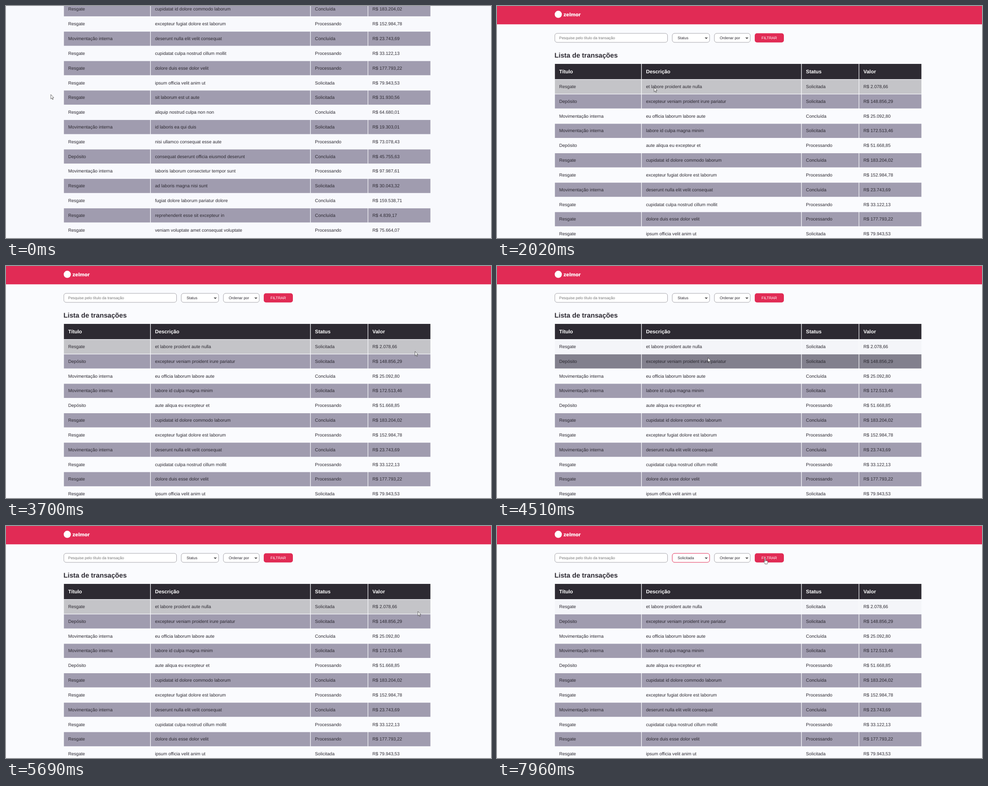
An HTML page with a canvas for the animation above (7.99 s loop, 1082 px wide and 517 px high).

```html
<!DOCTYPE html>
<html lang="pt-BR">
<head>
<meta charset="utf-8">
<title>Lista de transações</title>
<style>
html, body { margin: 0; width: 100%; height: 100%; overflow: hidden; background: #fafbfe; }
canvas { display: block; }
</style>
</head>
<body>
<canvas id="stage" width="1082" height="517"></canvas>
<script>
const ctx = document.getElementById('stage').getContext('2d');
ctx.textRendering = 'geometricPrecision';

const W = 1082, H = 517, LOOP = 7990;
const PAGE = '#fafbfe', INK = '#2d2a32', PINK = '#e12b55', STRIPE = '#a09caf';
const SANS = '"Liberation Sans", Arial, sans-serif';
const ZOOM = 0.631;
const SMALL = 13.333 * ZOOM, BODY = 16 * ZOOM, LARGE = 18 * ZOOM, TITLE = 24 * ZOOM;
const PADDING = 15 * ZOOM, ROW_STEP = 52 * ZOOM, ROW_H = 50 * ZOOM, ROW_TOP = 164;
const COLUMNS = [[129.2, 321.7], [323, 678.6], [679.9, 806.9], [808.1, 946.8]];
const HEADINGS = ['Título', 'Descrição', 'Status', 'Valor'];

const KINDS = { R: 'Resgate', D: 'Depósito', M: 'Movimentação interna' };
const STATES = { S: 'Solicitada', P: 'Processando', C: 'Concluída' };
const ROWS = `R|et labore proident aute nulla|S|2.078,66
D|excepteur veniam proident irure pariatur|S|148.856,29
M|eu officia laborum labore aute|C|25.092,80
M|labore id culpa magna minim|S|172.513,46
D|aute aliqua eu excepteur et|P|51.668,85
R|cupidatat id dolore commodo laborum|C|183.204,02
R|excepteur fugiat dolore est laborum|P|152.984,78
M|deserunt nulla elit velit consequat|C|23.743,69
R|cupidatat culpa nostrud cillum mollit|P|33.122,13
R|dolore duis esse dolor velit|P|177.793,22
R|ipsum officia velit anim ut|S|79.943,53
R|sit laborum est ut aute|S|31.930,56
R|aliquip nostrud culpa non non|C|64.680,01
M|id laboris ea qui duis|S|19.303,01
R|nisi ullamco consequat esse aute|P|73.078,43
D|consequat deserunt officia eiusmod deserunt|C|45.755,63
M|laboris laborum consectetur tempor sunt|P|97.987,61
R|ad laboris magna nisi sunt|S|30.043,32
R|fugiat dolore laborum pariatur dolore|C|159.538,71
R|reprehenderit esse sit excepteur in|C|4.839,17
R|veniam voluptate amet consequat voluptate|P|75.664,07`.split('\n').map(line => {
  const [kind, note, state, value] = line.split('|');
  return [KINDS[kind], note, STATES[state], 'R$ ' + value];
});

// start, end, target x, target y, optional bend of the path
const MOVES = [
  [1240, 2010, 350, 181, -5],
  [2540, 2541, 360, 181],
  [2680, 3140, 891, 182],
  [3150, 3400, 907, 189.5],
  [3520, 3550, 912, 190],
  [3890, 4500, 470, 204],
  [4970, 5480, 918.5, 190, 4],
  [5850, 6370, 416.5, 73],
  [6680, 7080, 417, 101],
  [7290, 7320, 416, 101],
  [7530, 7960, 598, 72, 18]
];

function cursorAt(t) {
  let x = 99.5, y = 197;
  for (const [start, end, toX, toY, bend = 0] of MOVES) {
    if (t < start) break;
    const u = Math.min(1, (t - start) / (end - start));
    const e = u * u * (3 - 2 * u);
    x += (toX - x) * e;
    y += (toY - y) * e + bend * 4 * e * (1 - e);
  }
  return { x, y };
}

function rect(x, y, w, h, color) {
  ctx.fillStyle = color;
  ctx.fillRect(x, y, w, h);
}

function rounded(x, y, w, h, fill, stroke) {
  ctx.beginPath();
  ctx.roundRect(x, y, w, h, 5);
  ctx.fillStyle = fill;
  ctx.fill();
  if (!stroke) return;
  ctx.strokeStyle = stroke;
  ctx.lineWidth = 1;
  ctx.stroke();
}

function disc(x, y, r, color) {
  ctx.fillStyle = color;
  ctx.beginPath();
  ctx.arc(x, y, r, 0, 7);
  ctx.fill();
}

function line(points, color, width) {
  ctx.beginPath();
  points.forEach(([x, y]) => ctx.lineTo(x, y));
  ctx.strokeStyle = color;
  ctx.lineWidth = width;
  ctx.stroke();
}

// y is the middle of the capitals
function text(str, x, y, size, { color = INK, weight = 400, align = 'left', family = SANS } = {}) {
  ctx.font = `${weight} ${size}px ${family}`;
  ctx.textAlign = align;
  ctx.fillStyle = color;
  ctx.fillText(str, x, y + size * 0.36);
}

function select(x, w, label, focused) {
  rounded(x + 0.5, 61, w, 20, '#fff', focused ? PINK : '#a5a4aa');
  text(label, x + 12.5, 71, SMALL);
  const cx = x + w - 7;
  line([[cx - 2.3, 70], [cx, 72.4], [cx + 2.3, 70]], '#222', 1.4);
}

function drawTop(t) {
  rect(0, 0, W, 40.8, PINK);
  disc(136.7, 18.6, 8, '#fff');
  text('zelmor', 148, 19, 11.4, { color: '#fff', weight: 800, family: 'Inter, sans-serif' });

  rounded(129, 61, 251.5, 20, '#fff', '#a5a4aa');
  text('Pesquise pelo título da transação', 138.8, 71, SMALL, { color: '#757575' });
  select(390.5, 83.3, t >= 7530 ? 'Solicitada' : 'Status', t >= 6680);
  select(484.5, 80, 'Ordenar por');
  rounded(575, 60.7, 65, 20.6, PINK);
  text('FILTRAR', 607.3, 71, SMALL, { color: '#fff', align: 'center' });

  text('Lista de transações', 128.2, 110, TITLE, { weight: 700 });
  COLUMNS.forEach(([left, right], i) => {
    rect(left, 129, right - left, 34, INK);
    text(HEADINGS[i], left + PADDING, 146, LARGE, { color: '#fff', weight: 700 });
  });
}

function rowColor(i, hovered, t) {
  if (i % 2) return hovered ? '#82808d' : STRIPE;
  if (hovered) return '#c4c4c8';
  return i === 0 && t >= 3700 ? '#f4f5f9' : null;
}

function drawRows(t, hoverRow) {
  ROWS.forEach((cells, i) => {
    const top = ROW_TOP + i * ROW_STEP;
    const color = rowColor(i, i === hoverRow, t);
    COLUMNS.forEach(([left, right], c) => {
      if (color) rect(left, top, right - left, ROW_H, color);
      text(cells[c], left + PADDING, top + 15.4, BODY);
    });
  });
}

function drawModal(row, account, closeHover) {
  rect(0, 0, W, H, 'rgba(0,0,0,.7)');
  rect(129, 156, 819, 222, '#000');
  rect(131, 158, 815, 218.5, '#fff');
  text(row[0], 150.1, 187.5, TITLE, { weight: 700 });
  const cross = closeHover ? '#aaa' : '#777';
  line([[912, 186], [918, 192]], cross, 1);
  line([[918, 186], [912, 192]], cross, 1);

  rect(151, 211, 387, 20, PINK);
  disc(538.4, 221, 12.8, INK);
  text('Solicitada', 150.3, 248, LARGE);
  text('Processando', 537.2, 248, LARGE, { align: 'center' });
  text('Concluída', 926, 248, LARGE, { align: 'right' });

  [['Transferindo de', account, 278], ['Para', 'Conta Zelmor', 321]].forEach(([title, name, y]) => {
    text(title, 150.3, y + 0.5, TITLE, { weight: 700 });
    rect(151, y + 7.7, 775, 1.3, INK);
    text(name, 150.3, y + 18.5, BODY);
    text(row[3], 926, y + 18.5, BODY, { align: 'right' });
  });
}

function drawOptions(t, cursorY) {
  ctx.save();
  ctx.shadowColor = 'rgba(0,0,0,.35)';
  ctx.shadowBlur = 4;
  ctx.shadowOffsetY = 1;
  rect(390.5, 81.5, 84, 44, '#fff');
  ctx.restore();
  if (t < 6710) return;
  const active = Math.max(0, Math.floor((cursorY - 81.5) / 11));
  ['Status', ...Object.values(STATES)].forEach((label, i) => {
    const y = 81.5 + i * 11;
    if (i === active) rect(390.5, y, 84, 11, '#1967d2');
    text(label, 403, y + 5.5, SMALL, { color: i === active ? '#fff' : INK });
  });
}

const ARROW = new Path2D('M.5 .3V10.2L2.8 8.1L4.4 11.6L5.8 11L4.3 7.6L7.2 7.4Z');
const HAND = new Path2D('M-1 1Q0 -.4 1 1V5Q2 4.2 2.8 5.3Q3.9 4.8 4.5 5.8Q5.8 5.4 6 6.7V9' +
  'Q5.8 10.6 5 11.3V12.7H-.2V11.5L-3 7.9Q-3.4 6.6 -2.2 6.7L-1 7.8Z');

function drawCursor({ x, y }, hand) {
  const shape = hand ? HAND : ARROW;
  ctx.save();
  ctx.translate(x, y);
  ctx.fillStyle = '#fff';
  ctx.fill(shape);
  ctx.strokeStyle = '#333';
  ctx.lineWidth = 0.75;
  ctx.lineJoin = 'round';
  ctx.stroke(shape);
  if (hand) line([[1, 5], [1, 7]], '#333', 0.7);
  ctx.restore();
}

function hoveredRow({ x, y }, scroll) {
  if (x < 129 || x > 947) return -1;
  return Math.floor((y + scroll - ROW_TOP) / ROW_STEP);
}

function draw(t) {
  const scroll = t < 90 ? 336.6 : t < 210 ? 65.6 : 0;
  const cursor = cursorAt(t);
  const firstModal = t >= 2050 && t < 3700;
  const secondModal = t >= 4540 && t < 5660;
  const modal = firstModal || secondModal;
  const overClose = modal && cursor.x > 908 && cursor.y > 185 && cursor.y < 194;
  const overButton = cursor.x > 575 && cursor.x < 640 && cursor.y > 61 && cursor.y < 81;

  rect(0, 0, W, H, t < 90 ? '#f8f9fd' : PAGE);
  ctx.save();
  ctx.translate(0, -scroll);
  drawTop(t);
  drawRows(t, modal ? -1 : hoveredRow(cursor, scroll));
  ctx.restore();

  if (firstModal) drawModal(ROWS[0], 'Independência', overClose);
  if (secondModal) drawModal(ROWS[1], 'Bolsa', overClose);
  if (t >= 6680 && t < 7530) drawOptions(t, cursor.y);
  drawCursor(cursor, overClose || overButton);
}

const begin = performance.now();
function tick() {
  draw((performance.now() - begin) % LOOP);
  requestAnimationFrame(tick);
}
tick();
</script>
</body>
</html>
```
